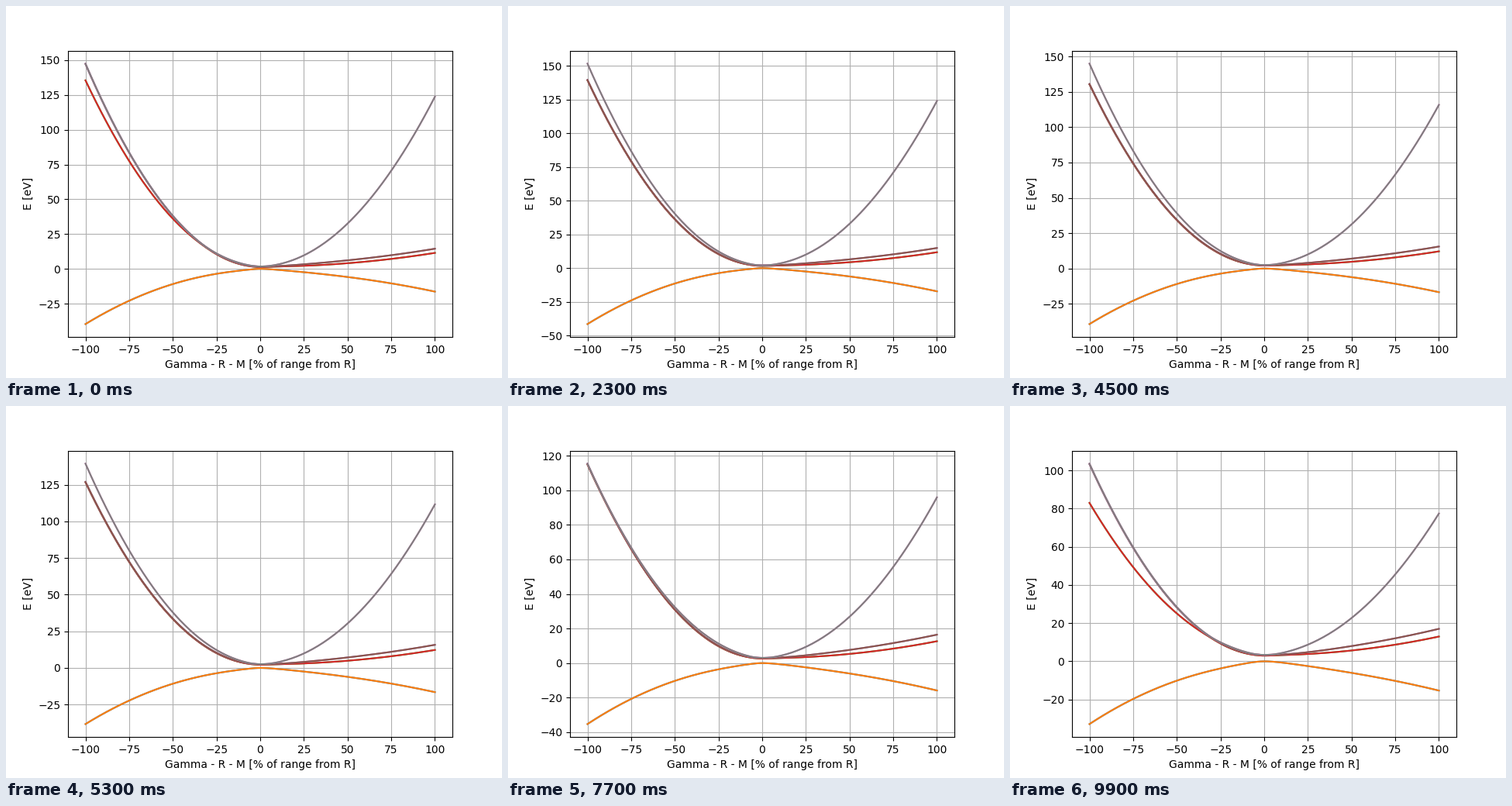
These frames come from a looping animation (640 by 480 pixels, 10 s). A matplotlib script:

```python
import numpy as np
import matplotlib.pyplot as plt
from matplotlib.animation import FuncAnimation

FRAMES = 100
SPLIT = 0.4  # spin-orbit splitting [eV]
k = np.linspace(-1, 1, 201)
left = k < 0


def spin_orbit():
    pauli = np.array([[[0, 1], [1, 0]], [[0, -1j], [1j, 0]], [[1, 0], [0, -1]]])
    total = np.zeros((8, 8), complex)
    for i in range(3):
        a, b = 1 + (i + 1) % 3, 1 + (i + 2) % 3
        ang = np.zeros((4, 4), complex)
        ang[a, b], ang[b, a] = -1j, 1j
        total += np.kron(ang, pauli[i])
    return total * SPLIT / 3


SO = spin_orbit()


def bands(u):
    """Sorted energies of an eight-band k.p model; u sweeps from 0 to 1."""
    edge = 1.3 + 1.68 * u + 2 * SPLIT / 3
    p2 = 84 + 32.7 * u
    decay = np.exp(-6.8 * u)

    # Curvatures; the trace over the p bands is the same for both directions.
    valence = 44.77 - 15 * u - 6.52 * decay
    along = 153.5 + 17.3 * u - 94.1 * u**2 - 21 * decay
    across = 145.8 - 33.5 * u - 12.1 * u**2
    flat = 9.9 - 0.15 * u
    steep = (along + 2 * across) / 3 - 2 * flat

    h = np.zeros((k.size, 4, 4), complex)
    h[:, 0, 0] = -np.where(left, valence, valence / 3) * k**2
    h[:, 1, 1] = edge + np.where(left, along, flat) * k**2
    h[:, 2, 2] = edge + np.where(left, across, flat) * k**2
    h[:, 3, 3] = edge + np.where(left, across, steep) * k**2
    for band, strength in ((1, np.where(left, 3, 1)), (3, np.where(left, 0, 1))):
        mix = 1j * k * np.sqrt(strength * p2)
        h[:, 0, band], h[:, band, 0] = mix, -mix
    return np.linalg.eigvalsh(np.kron(h, np.eye(2)) + SO)


fig, ax = plt.subplots(figsize=(6.4, 4.8), dpi=100)
lines = ax.plot(100 * k, bands(0))
ax.grid(True)
ax.set_xlabel("Gamma - R - M [% of range from R]")
ax.set_ylabel("E [eV]")


def update(i):
    for line, energy in zip(lines, bands(i / (FRAMES - 1)).T):
        line.set_ydata(energy)
    ax.relim()
    ax.autoscale_view()
    return lines


anim = FuncAnimation(fig, update, frames=FRAMES, interval=100,
                     repeat=True, repeat_delay=0, blit=False)
plt.show()
```
